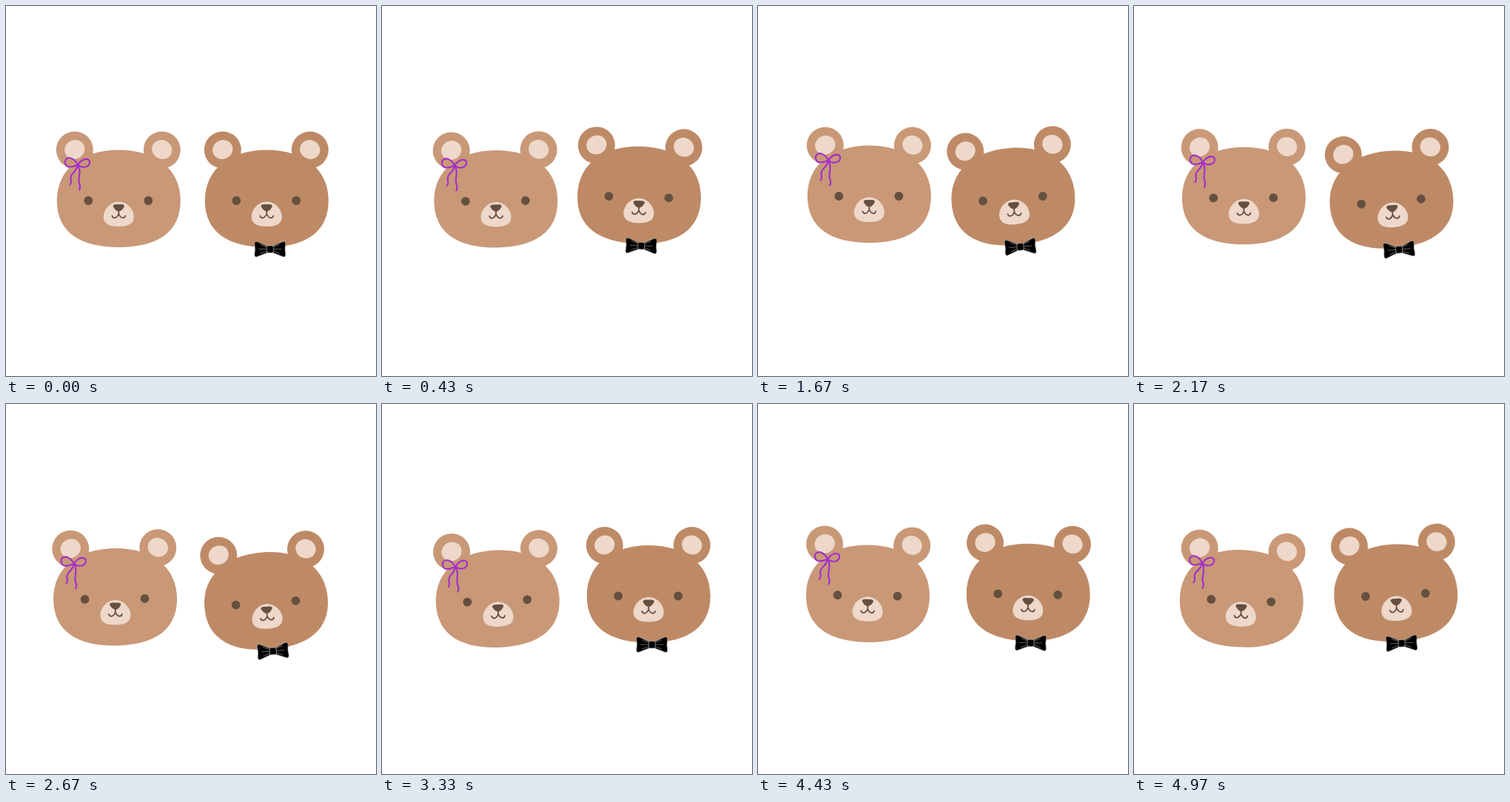
Animation, 500 px wide and 500 px high, one loop 5.01 s. Source, as an HTML page:

```html
<!DOCTYPE html>
<html lang="en">
<head>
<meta charset="utf-8">
<title>Two wobbling bears</title>
<style>
  html, body { margin: 0; width: 100%; height: 100%; overflow: hidden; background: #fff; }
  svg { display: block; width: 100vw; height: 100vh; }
  .line { fill: none; stroke-linecap: round; stroke-linejoin: round; }
</style>
</head>
<body>
<svg viewBox="0 0 500 500">
  <defs>
    <!-- One side of the face; the other side is its mirror image -->
    <g id="side">
      <circle cx="59" cy="-68.5" r="25" fill="currentColor"/>
      <ellipse rx="13.8" ry="12.7" fill="#edd8ca" transform="translate(59 -69) rotate(25)"/>
      <circle cx="40.5" r="5.9" fill="#655040"/>
    </g>
    <g id="bear">
      <path fill="currentColor" d="M.5-68.5C50-68.5 84-43 84 0S52 63 .5 63S-83 43-83 0S-49-68.5 .5-68.5Z"/>
      <use href="#side"/>
      <use href="#side" transform="scale(-1 1)"/>
      <path fill="#edd8ca" d="M.5 1.500C12 1.500 21 12 21 22S12 35 .5 35S-20 32-20 22S-11 1.500 .5 1.500Z"/>
      <path fill="#655040" d="M-4 5H5Q8.500 5.500 8 8Q5 14 .5 14.500Q-4 14-7 8Q-7.500 5.500-4 5Z"/>
      <path class="line" stroke="#655040" stroke-width="1.8" d="M.5 14V18M-8.500 20.500C-7 25-2 24 .5 18C3 24 8 25 9.500 20.500"/>
    </g>
    <g id="wing">
      <path fill="#000" stroke="#aaa" stroke-width=".7" d="M4-4L17-10Q21-11 21-7Q19.500 0 21 7Q21 11 18 10.500L4 5Z"/>
      <path class="line" stroke="#888" stroke-width=".7" d="M5-3L13-6M5 0H15M5 3L13 6"/>
    </g>
  </defs>

  <g id="left" color="#c99877">
    <use href="#bear"/>
    <g class="line" stroke="#a32dcd" stroke-width="2.1" transform="translate(-54.800 -48.500)">
      <path d="M0 0C-4-8-11-11-15-8S-17 3-11 3S-3 1 0 0C4-6 10-9 14-7S16 2 10 3S3 2 0 0"/>
      <path d="M-.5 1C-2 11-9 10-9.500 17S-7 22-10.500 27M.5 1C5 10 1 15 1.500 22S5 27 2 34"/>
    </g>
  </g>

  <g id="right" color="#be8a66">
    <use href="#bear"/>
    <g transform="translate(5 65.500)">
      <use href="#wing"/>
      <use href="#wing" transform="scale(-1 1)"/>
      <rect x="-4.500" y="-4.500" width="9" height="9.500" rx="2" stroke="#aaa" stroke-width=".7"/>
    </g>
  </g>
</svg>

<script>
const LOOP = 5010, FRAME = 1000 / 30, LAST = 149;

// Key poses: time, then [x, y, angle] of each bear relative to its home
const poses = [
  { time: 0, left: [0, 0, 0], right: [0, 0, 0] },
  { time: 930, left: [2.5, 0, -1], right: [-9, -8.5, 2.1] },
  { time: 1670, left: [-2, -6, 0], right: [-7.4, -2.7, -4.5] },
  { time: 2670, left: [-4.7, .5, -.7], right: [-.7, 5.8, -4.1] },
  { time: 2870, left: [-2, 3, -1.3], right: [0, 10, -2.5] },
  { time: 3330, left: [4, 3, -2.3], right: [8, -3.5, 0] },
  { time: 3870, left: [4.5, -4.2, -1.2], right: [-1.5, 4.7, .8] },
  { time: 4450, left: [-4, -4, 1], right: [13, -6, 1] },
  { time: 4970, left: [-7, 2.7, 2.4], right: [1.5, -5, -2.9] }
];
const home = { left: 151.8, right: 351.8 };

function slope(i, bear, axis) {
  const a = poses[Math.max(i - 1, 0)], b = poses[Math.min(i + 1, poses.length - 1)];
  return (b[bear][axis] - a[bear][axis]) / (b.time - a.time);
}

// Smooth cubic through the key poses
function track(bear, axis, t) {
  const i = Math.max(0, poses.findIndex(p => p.time >= t) - 1);
  const a = poses[i], b = poses[i + 1], d = b.time - a.time;
  const u = (t - a.time) / d, v = 1 - u;
  return a[bear][axis] * v * v * (1 + 2 * u) + b[bear][axis] * u * u * (3 - 2 * u)
    + d * u * v * (v * slope(i, bear, axis) - u * slope(i + 1, bear, axis));
}

function draw(now) {
  const frame = Math.min(Math.floor((now % LOOP + 5) / FRAME), LAST);
  for (const bear in home) {
    const [x, y, angle] = [0, 1, 2].map(axis => track(bear, axis, frame * FRAME));
    document.getElementById(bear).setAttribute("transform",
      `translate(${home[bear] + x} ${263 + y}) rotate(${angle})`);
  }
  requestAnimationFrame(draw);
}

draw(0);
</script>
</body>
</html>
```
